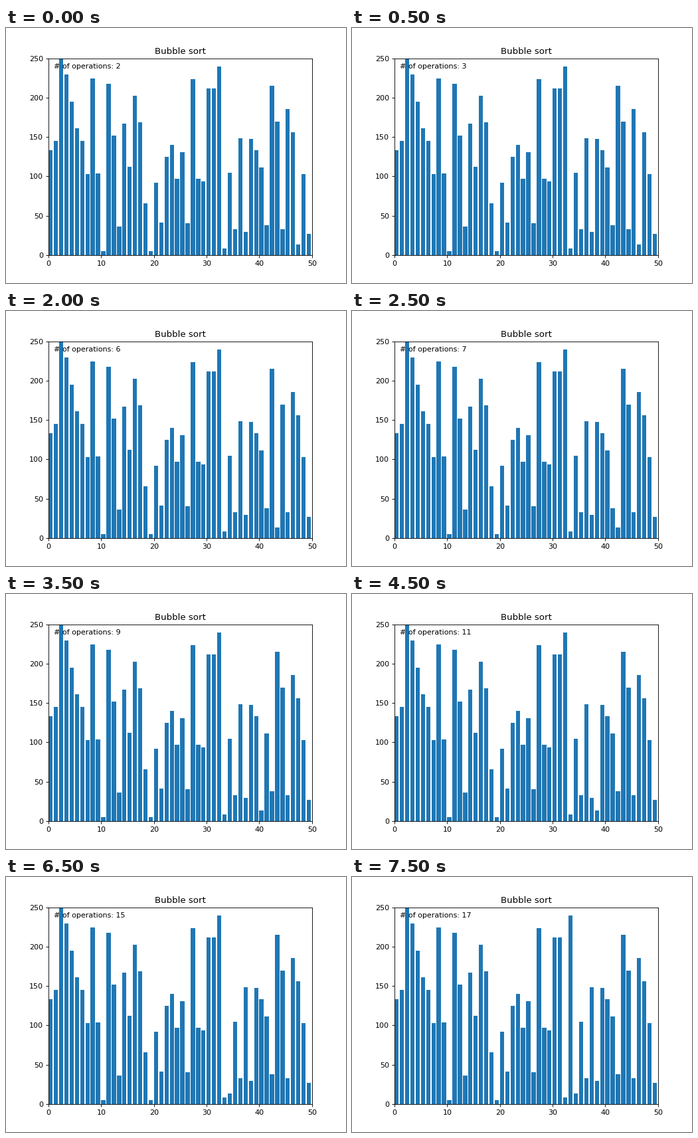
A matplotlib script that plays this animation: 512 by 384 pixels, repeating every 8000 ms.

```python
import matplotlib.pyplot as plt
from matplotlib.animation import FuncAnimation

FRAMES, INTERVAL = 16, 500
FIRST_OP = 2
VALUES = [
    133, 145, 250, 230, 195, 161, 145, 103, 225, 104,
    5, 218, 152, 36, 167, 112, 203, 169, 66, 5,
    92, 41, 125, 140, 97, 131, 40, 224, 97, 94,
    212, 212, 240, 8, 105, 33, 149, 29, 148, 133,
    111, 38, 215, 170, 33, 186, 156, 103, 13, 27,
]


def bubble(values, ops):
    """Return the list after `ops` comparisons, walking from the right end."""
    out = list(values)
    for op in range(1, ops + 1):
        j = len(out) - 1 - op
        if out[j] > out[j + 1]:
            out[j], out[j + 1] = out[j + 1], out[j]
    return out


fig, ax = plt.subplots(figsize=(6.4, 4.8), dpi=80)
ax.set_title("Bubble sort")
bars = ax.bar(range(len(VALUES)), VALUES, align="edge")
ax.set_xlim(0, len(VALUES))
ax.set_ylim(0, 250)
label = ax.text(0.02, 0.95, "", transform=ax.transAxes)


def update(frame):
    ops = FIRST_OP + frame
    for bar, height in zip(bars, bubble(VALUES, ops)):
        bar.set_height(height)
    label.set_text(f"# of operations: {ops}")
    return [*bars, label]


anim = FuncAnimation(fig, update, frames=FRAMES, interval=INTERVAL, repeat=True, repeat_delay=0)
plt.show()
```
